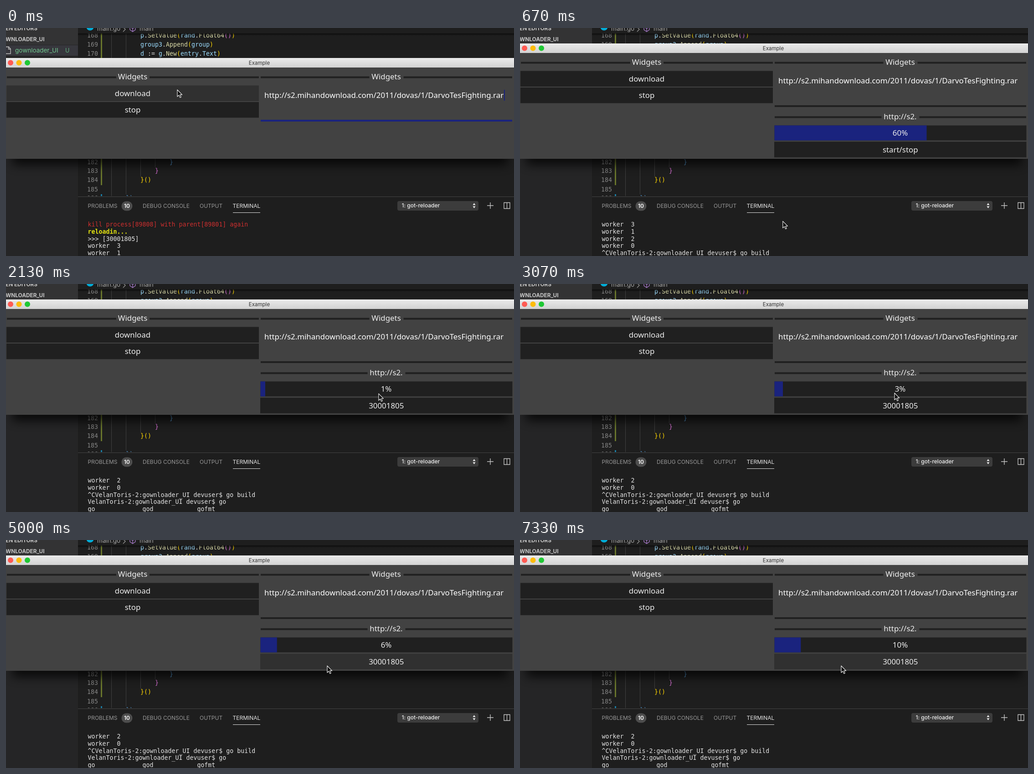
Animation of 1115 by 502 pixels, one loop 7390 ms. Source, as an HTML page:

```html
<!DOCTYPE html>
<html lang="en">
<head>
<meta charset="utf-8">
<title>Download manager demo</title>
<style>
  html, body { margin: 0; width: 100%; height: 100%; overflow: hidden; background: #1e1e1e; }
  svg { display: block; width: 1115px; height: 502px; }
  text { white-space: pre; }
  .ui { font-family: Inter, sans-serif; }
  .mono { font-family: "DejaVu Sans Mono", monospace; font-size: 13.29px; }
  .app { font-family: "Noto Sans", sans-serif; font-size: 16.87px; fill: #efefef; }
  .mid { text-anchor: middle; }
</style>
</head>
<body>
<svg id="stage" viewBox="0 0 1115 502">
  <defs>
    <filter id="blur" x="-10%" y="-40%" width="120%" height="180%"><feGaussianBlur stdDeviation="11"/></filter>
    <linearGradient id="bar" x2="0" y2="1"><stop stop-color="#ebebeb"/><stop offset="1" stop-color="#d2d2d2"/></linearGradient>
    <linearGradient id="fade" x2="0" y2="1"><stop stop-opacity=".6"/><stop offset="1" stop-opacity="0"/></linearGradient>
    <clipPath id="codeClip"><rect x="158" y="12" width="957" height="358"/></clipPath>
    <clipPath id="termClip"><rect x="158" y="424" width="957" height="78"/></clipPath>
  </defs>
  <g id="editor"></g>
  <g id="sidebar"></g>
  <g id="panel"></g>
  <g clip-path="url(#termClip)"><g id="term" class="mono"></g></g>
  <rect x="14" y="180" width="1087" height="121" opacity=".75" filter="url(#blur)"/>
  <rect id="body" width="1115" fill="#424242"/>
  <g id="win"></g>
  <path id="pointer" d="M0 0V15L3.5 11.8L6 17.2L8.3 16.2L6 10.9H10.6Z" fill="#111" stroke="#f4f4f4" stroke-width="1.1" stroke-linejoin="round"/>
</svg>
<script>
const LOOP = 7390, GROW = 200, PRESS = 1100;
const DARK = '#202020', HOVER = '#303030', NAVY = '#1a237e';
const $ = id => document.getElementById(id);

function add(parent, tag, attrs, content) {
  const el = document.createElementNS('http://www.w3.org/2000/svg', tag);
  for (const k in attrs) el.setAttribute(k, attrs[k]);
  if (content !== undefined) el.textContent = content;
  return parent.appendChild(el);
}
const rect = (p, x, y, width, height, fill, more) => add(p, 'rect', { x, y, width, height, fill, ...more });
const text = (p, x, y, s, more) => add(p, 'text', { x, y, ...more }, s);
const ui = (p, x, y, s, size, fill, more) => text(p, x, y, s, { class: 'ui', 'font-size': size, fill, ...more });
const path = (p, d, stroke, more) => add(p, 'path', { d, stroke, fill: 'none', ...more });

// Each run is [text, colour]
function runs(parent, x, y, list) {
  const line = add(parent, 'text', { x, y, class: 'mono' });
  for (const [s, fill] of list) add(line, 'tspan', { fill }, s);
}

function buildEditor() {
  const root = $('editor');
  rect(root, 0, 0, 1115, 502, '#1e1e1e');
  add(root, 'circle', { cx: 184.5, cy: -2.5, r: 8, fill: '#00acd7' });
  ui(root, 200, 6, 'main.go', 13.6, '#a9a9a9');
  path(root, 'M257 -2L262 3L257 8', '#a0a0a0', { 'stroke-width': 1.2 });
  path(root, 'M272 -2L278 1L284 -2V4L278 8L272 4ZM278 1V8', '#b180d7', { 'stroke-width': 1.2 });
  ui(root, 293, 6, 'main', 13.6, '#a9a9a9');

  const code = add(root, 'g', { 'clip-path': 'url(#codeClip)' });
  for (const [x, end] of [[231, 370], [263, 366], [295, 327], [327, 306]])
    for (const [a, b] of [[12, 67], [286, end]])
      if (a > 12 || x < 295) rect(code, x, a, 1, b - a, '#404040');
  rect(code, 208, 12, 3, 55, '#68752c');
  rect(code, 208, 286, 3, 60, '#68752c');
  rect(code, 208, 366, 3, 5, '#1b81a8');

  const W = '#d4d4d4', V = '#9cdcfe', F = '#dcdcaa', G = '#ffd700', P = '#da70d6', B = '#569cd6';
  const lines = [
    [168, 20.5, 295, [['p', V], ['.', W], ['SetValue', F], ['(', G], ['rand', V], ['.', W], ['Float64', F], ['()', P], [')', G]]],
    [169, 40.5, 295, [['group3', V], ['.', W], ['Append', F], ['(', G], ['group', V], [')', G]]],
    [170, 60.5, 295, [['d', V], [' := ', W], ['g', V], ['.', W], ['New', F], ['(', G], ['entry', V], ['.', W], ['Text', V], [')', G]]],
    [182, 299.5, 359, [['}', B]]],
    [183, 319.3, 327, [['}', P]]],
    [184, 339.3, 295, [['}()', G]]],
    [185, 359.5, 295, []],
    [186, 379, 263, [['})', B]]]
  ];
  for (const [n, y, x, list] of lines) {
    text(code, 178, y, n, { class: 'mono', fill: '#858585' });
    runs(code, x, y, list);
  }
  rect(root, 158, 12, 957, 5, 'url(#fade)');
}

function buildSidebar() {
  const root = $('sidebar');
  rect(root, 0, 0, 158, 502, '#252526');
  rect(root, 0, 0, 158, 37, '#333334');
  rect(root, 0, 38, 158, 23, '#37373d');
  ui(root, -1, 5, 'EN EDITORS', 11.8, '#c5c5c5', { 'font-weight': 700 });
  ui(root, -1, 29, 'WNLOADER_UI', 11.8, '#c5c5c5', { 'font-weight': 700 });
  path(root, 'M-3 41.5H6L10 46V56.5H-3M5.5 42V46.5H10', '#c5c5c5', { 'stroke-width': 1.3 });
  ui(root, 20, 54, 'gownloader_UI', 13.5, '#73c991');
  ui(root, 130, 53.5, 'U', 12.5, '#5fae7d');
}

function buildPanel() {
  const root = $('panel');
  rect(root, 158, 371, 957, 131, '#1e1e1e');
  rect(root, 158, 371, 957, 1, '#454545');
  for (const [x, s] of [[179.5, 'PROBLEMS'], [300, 'DEBUG CONSOLE'], [425, 'OUTPUT']])
    ui(root, x, 396, s, 12, '#989898');
  ui(root, 497.5, 396, 'TERMINAL', 12, '#e7e7e7');
  rect(root, 498, 406, 60, 1, '#e0e0e0');
  rect(root, 253.5, 381.5, 24, 21, '#4d4d4d', { rx: 10.5 });
  ui(root, 265.5, 396, '10', 12, '#fff', { class: 'ui mid', 'font-weight': 600 });
  rect(root, 859, 381, 178, 21, '#3c3c3c', { rx: 4 });
  ui(root, 868.5, 395.3, '1: got-reloader', 12, '#f0f0f0', { 'font-weight': 500 });
  add(root, 'path', { d: 'M1024.5 389.8L1027.5 385.5L1030.5 389.8ZM1024.5 392.5L1027.5 396.8L1030.5 392.5Z', fill: '#f0f0f0' });
  path(root, 'M1056 391H1070M1063 384V398', '#c5c5c5', { 'stroke-width': 1.4 });
  path(root, 'M1093 384.5H1106V397.5H1093ZM1099.5 384.5V397.5', '#c5c5c5', { 'stroke-width': 1.3 });
}

const ROW = 15.75;
function buildTerminal() {
  const lines = [
    'kill process[89808] with parent[89801] again', 'reloadin...', '>>> [30001805]',
    'worker  3', 'worker  1', 'worker  2', 'worker  0',
    '^CVelanToris-2:gownloader_UI devuser$ go build',
    'VelanToris-2:gownloader_UI devuser$ go',
    'go' + ' '.repeat(13) + 'god' + ' '.repeat(12) + 'gofmt'
  ];
  lines.forEach((s, i) => text($('term'), 179.5, 437 + i * ROW, s, {
    fill: ['#cd2f2f', '#e5e510'][i] || '#e5e5e5',
    'font-weight': i === 1 ? 700 : 400
  }));
}

// Window parts use the grown position; the group shifts down while small.
const win = $('win');
const label = (p, x, y, s) => text(p, x, y, s, { class: 'app mid' });
function heading(p, x0, x1, y, s, gap) {
  const c = (x0 + x1) / 2;
  rect(p, x0, y, c - gap - x0, 4, DARK);
  rect(p, c + gap, y, x1 - c - gap, 4, DARK);
  label(p, c - 0.5, y + 6.3, s);
}
function button(p, x, y, w, s) {
  const box = rect(p, x, y, w, 34.5, DARK);
  return { box, x, y, w, label: label(p, x + w / 2, y + 23.3, s) };
}

rect(win, 0, 34, 1115, 21, 'url(#bar)');
['#ff5a52', '#fdbc0a', '#1fc834'].forEach((fill, i) => add(win, 'circle', { cx: 10 + i * 18.5, cy: 44.5, r: 6, fill }));
ui(win, 556, 49, 'Example', 11.5, '#333', { class: 'ui mid' });
heading(win, 2, 555, 74.5, 'Widgets', 36.5);
heading(win, 559, 1111, 74.5, 'Widgets', 37.5);
const download = button(win, 1, 94.5, 554, 'download');
const stop = button(win, 1, 131, 554, 'stop');
text(win, 567, 122, 'http://s2.mihandownload.com/2011/dovas/1/DarvoTesFighting.rar', { class: 'app', style: 'fill:#fff' });
const caret = rect(win, 1093, 104, 2, 24, NAVY);
const underline = rect(win, 559, 170, 552, 4, DARK);
const group = add(win, 'g', {});
heading(group, 559, 1111, 194.3, 'http://s2.', 41.5);
rect(group, 558.5, 214.5, 553, 33, DARK);
const fill = rect(group, 558.5, 214.5, 0, 33, NAVY);
const percent = label(group, 834.5, 237, '');
const toggle = button(group, 558, 250.3, 553.5, 'start/stop');

// [ms, x, y]
const POINTER = [
  [0, 376, 136], [140, 376, 136], [330, 389, 146], [420, 390, 146], [600, 520, 360],
  [700, 600, 452], [830, 640, 460], [1040, 792, 262], [1180, 798, 260], [1330, 807, 247.5],
  [1700, 816, 242], [3070, 822, 240], [3400, 824, 241], [3800, 836, 262],
  [4200, 830, 266], [4650, 705, 277], [7390, 705, 277]
];
const PERCENT = [[1100, 0.27], [1330, 0.65], [3070, 3.35], [5000, 6.55], [6330, 8.77], [7330, 10.45], [7390, 10.5]];
const SCROLL = [[580, 0], [760, 5]];

function at(table, t, col = 1) {
  const i = table.findIndex(row => row[0] > t);
  if (i === 0) return table[0][col];
  if (i < 0) return table[table.length - 1][col];
  const a = table[i - 1], b = table[i];
  return a[col] + (b[col] - a[col]) * (t - a[0]) / (b[0] - a[0]);
}

function render(t) {
  const grown = t >= GROW, shift = grown ? 0 : 32;
  const x = at(POINTER, t, 1), y = at(POINTER, t, 2);
  $('pointer').setAttribute('transform', `translate(${x} ${y})`);
  win.setAttribute('transform', `translate(0 ${shift})`);
  $('body').setAttribute('y', 34 + shift);
  $('body').setAttribute('height', 254 - shift);
  for (const b of [download, stop, toggle]) {
    const dy = y - shift - b.y;
    const over = x > b.x && x < b.x + b.w && dy > -3 && dy < 36;
    b.box.setAttribute('fill', over ? HOVER : DARK);
  }
  caret.setAttribute('visibility', grown ? 'hidden' : 'visible');
  underline.setAttribute('fill', grown ? DARK : NAVY);
  group.setAttribute('visibility', grown ? 'visible' : 'hidden');

  const running = t >= PRESS, value = running ? at(PERCENT, t) : 60.4;
  fill.setAttribute('width', 5.53 * value);
  percent.textContent = Math.floor(value) + '%';
  toggle.label.textContent = running ? '30001805' : 'start/stop';
  $('term').setAttribute('transform', `translate(0 ${-ROW * Math.round(at(SCROLL, t))})`);
}

buildEditor();
buildSidebar();
buildPanel();
buildTerminal();
const start = performance.now();
function tick() {
  render((performance.now() - start) % LOOP);
  requestAnimationFrame(tick);
}
tick();
</script>
</body>
</html>
```
